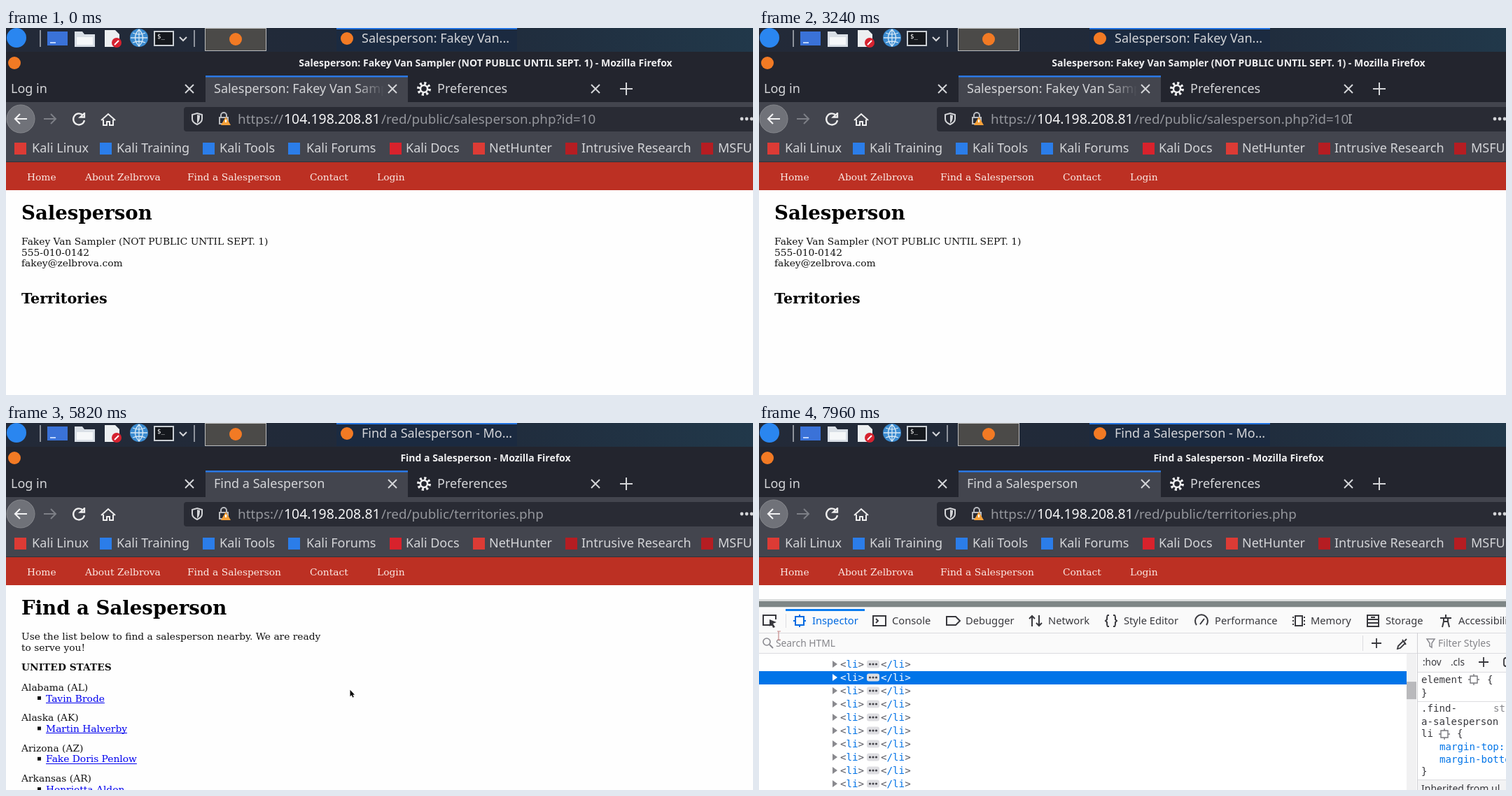
An HTML page with a canvas that plays this animation: 1067 px wide and 525 px high, repeating every 8 s.

```html
<!DOCTYPE html>
<html lang="en">
<head>
<meta charset="utf-8">
<title>Browser session</title>
<style>
html, body { margin: 0; width: 100%; height: 100%; overflow: hidden; background: #fff; }
canvas { display: block; }
</style>
</head>
<body>
<canvas id="stage" width="1067" height="525"></canvas>
<script>
const ctx = document.getElementById('stage').getContext('2d');
const UI = '"Noto Sans", sans-serif', SERIF = '"DejaVu Serif", serif', MONO = '"DejaVu Sans Mono", monospace';
const LIGHT = '#d4d5d8', DARK = '#23252e', BAR = '#43454e', BLUE = '#0074e8', RED = '#bc3023', INK = '#38383d';
const LOOP = 8000, STEP = 70;

const anchors = [0, 200, 1780, 2130, 2260, 3240, 5680, 6230, 6430, 7120];
// Pointer path: time, x, y
const pointerPath = [
  [200, 960, 502], [760, 497, 350], [900, 505, 346], [1040, 510, 342], [1250, 560, 322], [1520, 590, 295],
  [1780, 620, 293], [2130, 1056, 266], [2260, 1040, 245], [2540, 850, 130], [2610, 848, 122], [2750, 772, 122],
  [2890, 848, 126], [3240, 844, 130], [4010, 328, 212], [4080, 327, 213], [4360, 319, 374], [4850, 465, 420],
  [4990, 483, 425], [5060, 490, 420], [5270, 560, 350], [5340, 560, 362], [5480, 561, 373], [5680, 561, 373],
  [6230, 288, 407], [6500, 250, 434], [7120, 189, 443], [7540, 178, 440], [7960, 28, 304]];

function pointerAt(t) {
  const i = pointerPath.findIndex(p => p[0] > t);
  if (i < 0) return pointerPath[pointerPath.length - 1].slice(1);
  if (!i) return pointerPath[0].slice(1);
  const [a, ax, ay] = pointerPath[i - 1], [b, bx, by] = pointerPath[i], k = (t - a) / (b - a);
  return [ax + (bx - ax) * k, ay + (by - ay) * k];
}

function rect(x, y, w, h, color) {
  ctx.fillStyle = color;
  ctx.fillRect(x, y, w, h);
}
function text(s, x, y, size, color = LIGHT, font = UI, weight = 400) {
  ctx.font = `${weight} ${size}px ${font}`;
  ctx.fillStyle = color;
  ctx.fillText(s, x, y);
  return x + ctx.measureText(s).width;
}
// Strokes an SVG path, or fills it when the width is 0.
function path(d, x, y, color = LIGHT, width = 2) {
  ctx.save();
  ctx.translate(x, y);
  ctx.strokeStyle = ctx.fillStyle = color;
  ctx.lineWidth = width;
  const p = new Path2D(d);
  width ? ctx.stroke(p) : ctx.fill(p);
  ctx.restore();
}
function disc(x, y, r, color, width = 0) {
  ctx.beginPath();
  ctx.arc(x, y, r, 0, 7);
  ctx.fillStyle = ctx.strokeStyle = color;
  ctx.lineWidth = width;
  width ? ctx.stroke() : ctx.fill();
}
function clipped(x, y, w, h, draw) {
  ctx.save();
  ctx.beginPath();
  ctx.rect(x, y, w, h);
  ctx.clip();
  draw();
  ctx.restore();
}

const icon = {
  back: 'M9 0H-8M-1-7L-8 0L-1 7', forward: 'M-9 0H8M1-7L8 0L1 7',
  reload: 'M6-5A8 8 0 1 0 8 2M8-9V-2.5H2L8-8', close: 'M-6-6L6 6M6-6L-6 6', plus: 'M-9 0H9M0-9V9',
  add: 'M-7 0H7M0-7V7',
  star: 'M0-9L2.7-3L9-2.4L4.3 2L5.6 8.5L0 5L-5.6 8.5L-4.3 2L-9-2.4L-2.7-3Z',
  home: 'M-10 1L0-8L10 1M-7 0V8H-2V3H2V8H7V0', shield: 'M0-8L7-6V0Q7 5 0 8Q-7 5-7 0V-6Z',
  target: 'M-5-5H5V5H-5ZM0-8V-5M0 5V8M-8 0H-5M5 0H8'
};

function desktop(found) {
  const g = ctx.createLinearGradient(0, 0, 1067, 0);
  g.addColorStop(0, '#232a38');
  g.addColorStop(.6, '#202a3a');
  g.addColorStop(1, '#21384a');
  rect(0, 0, 1067, 34, g);
  disc(15, 14, 14, '#2a86f0');
  rect(48, 3, 2, 24, '#8d929b');
  rect(268, 3, 2, 24, '#8d929b');
  rect(59, 5, 29, 20, '#3a72d8');
  rect(63, 20, 8, 2, '#bcd4ff');
  path('M0 0H11L14 4H29V22H0Z', 98, 5, '#d9dfe6', 0);
  rect(101, 13, 23, 11, '#f5f7f9');
  path('M0 0H15L21 6V24H0Z', 141, 3, '#eceff1', 0);
  disc(158, 21, 7, '#d5222f');
  path('M-3 3L3-3', 158, 21, '#fff');
  disc(190, 14, 13, '#3b8bd0');
  path('M-12 0H12M0-12V12M-9-7Q0-3 9-7M-9 7Q0 3 9 7M0-12Q-11 0 0 12Q11 0 0-12', 190, 14, '#d6e8f5', 1.3);
  rect(211, 4, 29, 22, '#c9ced3');
  rect(213, 6, 25, 18, '#15181d');
  text('$_', 216, 15, 9, '#fff', MONO);
  path('M-5-2L0 3L5-2', 253, 15);
  rect(284, 0, 88, 33, '#bcbcbc');
  rect(285, 1, 86, 31, '#4b4a48');
  disc(328, 16, 9, '#f27a24');
  rect(472, 0, 258, 33, '#1b2a40');
  rect(472, 0, 258, 2, '#2674de');
  disc(487, 15, 9, '#f27a24');
  text(found ? 'Find a Salesperson - Mo...' : 'Salesperson: Fakey Van...', 508, 21, 18);
}

function tabStrip(found, loading) {
  rect(0, 34, 1067, 72, DARK);
  disc(12, 50, 9, '#f27a24');
  const name = found ? 'Find a Salesperson' : 'Salesperson: Fakey Van Sampler (NOT PUBLIC UNTIL SEPT. 1)';
  ctx.textAlign = 'center';
  text(name + ' - Mozilla Firefox', 685, 55, 14, '#f0f0f1', UI, 700);
  ctx.textAlign = 'left';
  text('Log in', 7, 93, 18);
  rect(285, 68, 289, 38, BAR);
  rect(285, 68, 289, 2.5, '#2a78e4');
  const fade = ctx.createLinearGradient(500, 0, 540, 0);
  fade.addColorStop(0, LIGHT);
  fade.addColorStop(1, BAR);
  clipped(290, 72, 250, 34, () => text(name, loading ? 325 : 297, 93, 18, fade));
  if (loading) disc(313, 87, 2.5, '#a9abb0');
  [262, 552, 842].forEach(x => path(icon.close, x, 87));
  disc(597, 87, 5, '#f0f0f1', 2.5);
  ctx.setLineDash([3, 3.28]);
  disc(597, 87, 8, '#f0f0f1', 4);
  ctx.setLineDash([]);
  text('Preferences', 616, 93, 18);
  path(icon.plus, 886, 87);
}

function toolbar(found, loading) {
  rect(0, 106, 1067, 86, BAR);
  disc(21, 130, 20, '#707279');
  disc(21, 130, 20, '#85878c', 1);
  path(icon.back, 21, 130, '#f2f2f3', 2.2);
  path(icon.forward, 63, 130, '#7d7f86');
  path(loading ? 'M-8-8L8 8M8-8L-8 8' : icon.reload, 104, 130, '#eee', 2.3);
  path(icon.home, 146, 131, '#eee');
  ctx.beginPath();
  ctx.roundRect(254, 113, 840, 35, 4);
  ctx.fillStyle = '#292b34';
  ctx.fill();
  path(icon.shield, 273, 130);
  path('M0-6V6Q4 4 4-5Z', 273, 130, LIGHT, 0);
  path('M-6-1H6V8H-6ZM-4-1V-4A4 4 0 0 1 4-4V-1', 311, 129, '#b9bbc0');
  path('M0-6L7 6H-7Z', 314, 133, '#f5a13a', 0);
  rect(313, 131, 2, 4, '#fff');
  text('https://', 331, 137, 18.9, '#94969c');
  text('104.198.208.81', 397, 137, 19.4, '#f5f5f6');
  text(found ? '/red/public/territories.php' : '/red/public/salesperson.php?id=10', 536, 137, 18.8, '#94969c');
  [1051, 1058, 1065].forEach(x => disc(x, 130, 2.4, LIGHT));
  const marks = [
    [11, 37, 'Kali Linux', '#dc3b35'], [133, 158, 'Kali Training', '#2b7de9'], [280, 305, 'Kali Tools', '#2b7de9'],
    [402, 429, 'Kali Forums', '#2b7de9'], [547, 571, 'Kali Docs', '#d8222c'], [666, 690, 'NetHunter', '#dc3b35'],
    [798, 822, 'Intrusive Research', '#b51d22'], [992, 1017, 'MSFU', '#b51d22']];
  for (const [ix, tx, label, color] of marks) {
    rect(ix + 1, 164, 17, 17, color);
    text(label, tx, 178, 18);
  }
  rect(0, 191, 1067, 1, '#30323a');
}

function page(found) {
  const serif = (s, x, y, weight, size = 13.8, color = '#111') => text(s, x, y, size, color, SERIF, weight);
  rect(0, 192, 1067, 333, '#fefefe');
  rect(0, 192, 1067, 40, RED);
  [['Home', 30], ['About Zelbrova', 113], ['Find a Salesperson', 259], ['Contact', 434], ['Login', 530]]
    .forEach(([s, x]) => serif(s, x, 218, 400, 13.8, '#fbe9e4'));
  serif(found ? 'Find a Salesperson' : 'Salesperson', 22, 274, 700, 27.6, '#000');
  if (!found) {
    serif('Fakey Van Sampler (NOT PUBLIC UNTIL SEPT. 1)', 22, 310);
    serif('555-010-0142', 22, 326);
    serif('fakey@zelbrova.com', 22, 341);
    serif('Territories', 22, 394, 700, 20.7, '#000');
    return;
  }
  serif('Use the list below to find a salesperson nearby. We are ready', 22, 310);
  serif('to serve you!', 22, 326);
  serif('UNITED STATES', 22, 354, 700);
  [['Alabama (AL)', 'Tavin Brode'], ['Alaska (AK)', 'Martin Halverby'],
    ['Arizona (AZ)', 'Fake Doris Penlow'], ['Arkansas (AR)', 'Henrietta Aldon']].forEach(([state, person], i) => {
    const y = 383 + i * 43.4;
    serif(state, 22, y);
    rect(45, y + 8, 5, 5, '#111');
    const end = serif(person, 57, y + 15.5, 400, 13.8, '#0000ee');
    rect(57, Math.round(y + 17), end - 57, 1, '#0000ee');
  });
}

// An underscore marks the access key that follows it.
const menuItems = ['Save _Page As...', 'Save Page to Bas_ket', 'Se_nd Page to Device', 'Vie_w Background Image',
  'Select _All', '_View Page Source', 'View Page _Info', 'Inspect Element (_Q)', 'Take a Screenshot'];

function menu(x, y, [px, py]) {
  rect(x, y, 267, 343, '#15171d');
  rect(x + 1, y + 1, 265, 341, '#1f212b');
  path(icon.back, x + 35, y + 24, '#f2f2f3', 2.3);
  path(icon.forward, x + 100, y + 24, '#7d7f86');
  path(icon.reload, x + 167, y + 24, '#f2f2f3', 2.4);
  path(icon.star, x + 232, y + 24, '#f2f2f3');
  const inside = px > x && px < x + 267 && py < y + 343;
  const hovered = inside ? Math.floor((py - y - 48) / 32.5) : -1;
  menuItems.forEach((item, i) => {
    if (i === hovered) rect(x + 1, y + 48 + i * 32.5, 265, 32, '#2878ff');
    const color = i === 3 ? '#66676e' : LIGHT, base = y + 70 + i * 32.75;
    const [before, after] = item.split('_');
    if (after === undefined) return text(item, x + 36, base, 17.9, color);
    text(before + after, x + 36, base, 17.9, color);
    const from = ctx.measureText(before).width;
    rect(x + 36 + from, Math.round(base + 2), ctx.measureText(after[0]).width, 1.2, color);
  });
  path('M-2-4L2 0L-2 4', x + 252, y + 129);
  path('M-8-5L7 5M-8 5L7-5M-9-8H9', x + 19, y + 326, '#08090b', 2);
  disc(x + 11, y + 320, 2.5, '#08090b', 2);
  disc(x + 11, y + 332, 2.5, '#08090b', 2);
}

const tools = [
  ['Inspector', 76, 58, 'M-6-6H6V6H-6ZM0-9V-6M0 6V9M-9 0H-6M6 0H9'],
  ['Console', 190, 175, 'M-12-7H6V7H-12ZM-8-3L-5 0L-8 3'],
  ['Debugger', 295, 277, 'M-9-6H4L10 0L4 6H-9Z'],
  ['Network', 413, 398, 'M-8 8V-7M-12-3L-8-7L-4-3M2-8V7M-2 3L2 7L6 3'],
  ['Style Editor', 521, 503, 'M-3-8H-5Q-6-8-6-2L-8 0L-6 2Q-6 8-5 8H-3M3-8H5Q6-8 6-2L8 0L6 2Q6 8 5 8H3'],
  ['Performance', 651, 632, 'M-7 6A9 9 0 1 1 7 6M-2 5L4-3'],
  ['Memory', 788, 771, 'M-5-7H5V7H-5ZM-9-5H-7M-9 0H-7M-9 5H-7M7-5H9M7 0H9M7 5H9'],
  ['Storage', 895, 877, 'M-8-8H8V8H-8ZM-8-2H8M-8 3H8M-3-5H3'],
  ['Accessibility', 999, 981, 'M-8-4H8M0-9V-4M-3-4V1L-5 9M3-4V1L5 9M-3 1H3']];

function devtools(filled, showRules, scroll, hoverY, tip) {
  rect(0, 252, 1067, 273, '#fff');
  rect(0, 252, 1067, 12, '#d9dbdb');
  rect(0, 255, 1067, 8, '#7e8686');
  rect(0, 264, 1067, 66, '#fafafa');
  rect(0, 300, 1067, 1, '#dcdce0');
  rect(0, 329, 1067, 1, '#dcdce0');
  rect(38, 266, 113, 3, '#0a7cf0');
  path('M4 7H-9V-7H9V-1', 15, 282, INK);
  path('M0-2L10 2L5 4L8 9L5 10L3 5L0 8Z', 15, 283, INK, 0);
  rect(38, 273, 1, 20, '#dcdce0');
  tools.forEach(([label, tx, ix, d], i) => {
    const color = i ? INK : '#0069e0';
    path(d, ix, 283, color);
    text(label, tx, 288, 14.7, color);
  });
  disc(11, 313, 5, '#8a8a90', 1.6);
  path('M0 0L5 5', 15, 317, '#8a8a90');
  text('Search HTML', 24, 320, 13.8, '#85858a');
  rect(862, 304, 1, 22, '#dcdce0');
  path(icon.add, 882, 315, INK, 1.8);
  path('M-7 8L-6 4L1-3L4 0L-3 7ZM0-5L5 2M3-3L6-6', 919, 315, INK, 1.8);
  path('M-5-6H6L2 0V6L-1 4V0Z', 959, 315, '#8a8a90', 1.5);
  text('Filter Styles', 970, 320, 14, '#85858a');
  if (filled) tree(scroll, hoverY);
  rect(940, 300, 1, 225, '#d0d0d4');
  rect(941, 330, 126, 26, '#fafafa');
  text(':hov', 948, 347, 13.5, INK, UI, 500);
  text('.cls', 988, 347, 13.5, INK, UI, 500);
  path(icon.add, 1035, 342, INK, 1.8);
  path('M3-6Q0-6 0-3V3Q0 6 3 6', 1064, 342, INK, 1.8);
  rect(941, 356, 126, 1, '#dcdce0');
  if (showRules) rules();
  if (!tip) return;
  ctx.setLineDash([4, 3]);
  path('M0 0V60', 22.5, 192, '#5f8fae', 1);
  ctx.setLineDash([]);
  ctx.beginPath();
  ctx.roundRect(645, 215, 110, 32, 2);
  ctx.fillStyle = '#41474f';
  ctx.fill();
  text('li', 656, 237, 14, '#a8d5f5');
  rect(672, 224, 1, 15, '#747a82');
  text('1574 × 39', 680, 237, 14, '#d5dade');
}

function tree(scroll, hoverY) {
  const code = (s, x, y, color = BLUE) => text(s, x, y, 14.2, color, MONO);
  const arrow = (x, y, open, color) => path(open ? 'M-5-3H5L0 4Z' : 'M-3-5L4 0L-3 5Z', x, y, color, 0);
  const tag = (name, x, y, edge, color) => code('>', code(name, code('<', x, y, edge), y, color), y, edge);
  clipped(0, 332, 939, 193, () => {
    const top = 337 - scroll, GREY = '#5c5c64';
    arrow(79, top, true, '#8a8a8f');
    tag('li', 88, top + 5, GREY, BLUE);
    code('::marker', 102, top + 24);
    code('UNITED STATES', 102, top + 42, '#3a3a3f');
    arrow(93, top + 57, true, '#8a8a8f');
    const attr = code(' class', code('ul', code('<', 102, top + 61, GREY), top + 61), top + 61, '#dd00a9');
    const value = code('"states"', code('=', attr, top + 61, GREY), top + 61, '#003eaa');
    code('>', value, top + 61, GREY);
    for (let i = 0; i < 11; i++) {
      const y = top + 75.5 + i * 19, selected = i === 1;
      if (selected) rect(0, Math.round(y - 9.5), 925, 19, BLUE);
      else if (Math.abs(hoverY - y) < 9.5) rect(0, Math.round(y - 9.5), 925, 19, '#eef6ff');
      const edge = selected ? '#fff' : GREY, name = selected ? '#fff' : BLUE;
      arrow(108, y, false, selected ? '#fff' : '#8a8a8f');
      tag('li', 116, y + 4.5, edge, name);
      ctx.beginPath();
      ctx.roundRect(154, y - 5.5, 18, 11, 3);
      ctx.fillStyle = '#dedee2';
      ctx.fill();
      [158.5, 163, 167.5].forEach(x => disc(x, y, 1.6, '#45454b'));
      tag('/li', 174, y + 4.5, edge, name);
    }
  });
  rect(925, 330, 14, 195, '#f1f1f2');
  rect(925, 360 + scroll * .15, 14, 25, '#b9b9bc');
}

function rules() {
  const code = (s, x, y, color = INK) => text(s, x, y, 14.1, color, MONO);
  code('element', 946, 372);
  path(icon.target, 1021, 367, '#77777c', 1.4);
  code('{', 1040, 372);
  code('}', 946, 391);
  rect(941, 398, 126, 1, '#dcdce0');
  code('.find-', 946, 413);
  code('st', 1049, 413, '#85858a');
  code('a-salesperson (', 946, 432);
  code('li', 946, 449);
  path(icon.target, 979, 445, '#77777c', 1.4);
  code('{', 997, 449);
  code('margin-top:', 972, 468, BLUE);
  code('margin-bottom:', 972, 486, BLUE);
  code('}', 946, 503);
  rect(941, 510, 126, 15, '#f3f3f4');
  rect(941, 510, 126, 1, '#dcdce0');
  text('Inherited from ul', 946, 528, 14, INK);
}

function pointer(t, [x, y]) {
  if (t >= 2540 && t < 3380 || t >= 7960) {
    path('M-2-6H3M0-6V6M-2 6H3', x, y, t >= 7960 ? '#c58a8a' : '#d8d9dc', 1.2);
  } else if (t >= 3940 && t < 4150) {
    const hand = 'M-2 0Q0-2 2 0V5L8 7V11L6 15H0L-5 9L-2 9Z';
    path(hand, x, y, '#fff', 2);
    path(hand, x, y, '#111', 0);
  } else {
    const arrow = 'M0 0V9.5L2.2 7.6L3.8 11L5.3 10.2L3.8 7H6.5Z';
    path(arrow, x, y, '#fff', 1.4);
    path(arrow, x, y, '#0a0a0a', 0);
  }
}

function frame(now) {
  const time = now % LOOP;
  const anchor = anchors.filter(a => a <= time).pop();
  const t = anchor + Math.floor((time - anchor) / STEP) * STEP;
  const between = (a, b) => t >= a && t < b;
  const found = t >= 4290, loading = between(4080, 4920), pos = pointerAt(t);
  desktop(found);
  tabStrip(found, loading);
  toolbar(found, loading);
  page(t >= 4570);
  if (t >= 5890) {
    const scroll = 67.5 * Math.min(1, Math.max(0, (t - 7260) / 280));
    devtools(t >= 6430, t >= 6500, scroll, pos[1], between(6430, 7750));
  }
  const hover = pointerAt(t - STEP);
  if (between(900, 2260)) menu(506, 3, hover);
  if (between(5060, 5680)) menu(483, 83, hover);
  if (t >= 200) pointer(t, pos);
  requestAnimationFrame(frame);
}
requestAnimationFrame(frame);
</script>
</body>
</html>
```
